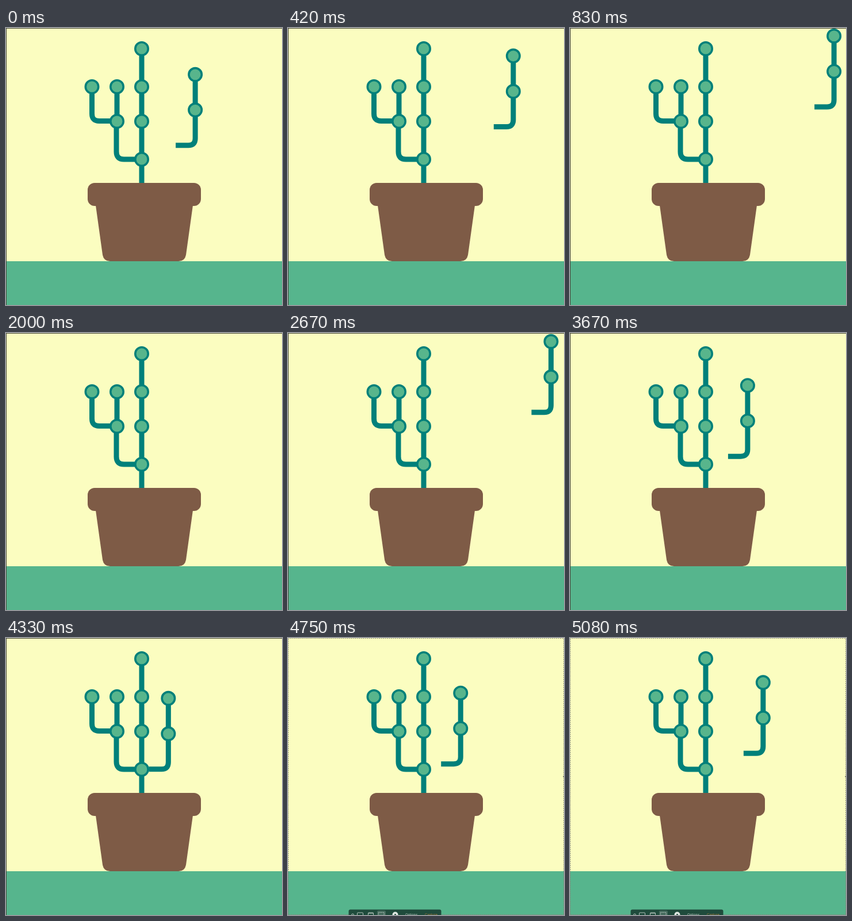
These frames come from a looping animation (480x481 px, 5.16 s). An HTML page:

```html
<!DOCTYPE html>
<html lang="en">
<head>
<meta charset="utf-8">
<title>Potted branches</title>
<style>
html, body { margin: 0; width: 100%; height: 100%; overflow: hidden; background: #fbfdc0; }
svg { display: block; width: 480px; height: 481px; }
.branch { fill: none; stroke: #00807a; stroke-width: 9; }
.node { fill: #58b58c; stroke: #00807a; stroke-width: 3.6; }
.label { font: 5.8px Inter, sans-serif; }
</style>
</head>
<body>
<svg viewBox="0 0 480 481" xmlns="http://www.w3.org/2000/svg">
  <rect width="480" height="481" fill="#fbfdc0"/>
  <rect y="405" width="480" height="76" fill="#56b58d"/>
  <g class="branch">
    <path d="M236 36V270"/>
    <path d="M193 102V162M192 162V215Q192 228 205 228H236"/>
    <path d="M149.5 102V149Q149.5 161.500 162 161.500H193"/>
  </g>
  <g id="arm">
    <path class="branch" d="M0 0V111Q0 123 -12 123H-34"/>
  </g>
  <g id="plant"></g>
  <g fill="#7e5b46">
    <rect x="142" y="269" width="197" height="40" rx="12"/>
    <path d="M156 308H325L313 394Q311 405 300 405H181Q170 405 168 394Z"/>
  </g>
  <path id="edge" d="M0 .5H480M.5 0V481" fill="none" stroke="#45473a"/>
  <g id="panel">
    <rect x=".5" y=".5" width="479" height="480" fill="none" stroke="#85877a" stroke-dasharray="2 1.500"/>
    <rect x="478.500" y="239.500" width="2" height="2" fill="#555"/>
    <rect x="105.500" y="471.500" width="161" height="20" rx="3" fill="#1f4b3c"/>
    <g fill="none" stroke="#c5d2cb" stroke-width=".9">
      <circle cx="112.500" cy="481" r="2"/>
      <rect x="120.500" y="477" width="10" height="8" rx="1"/>
      <rect x="139.500" y="477" width="9" height="8" rx="1"/>
      <path d="M139.500 478H148.500"/>
      <rect x="155" y="473.500" width="15" height="14" rx="2" fill="#466c5e" stroke="none"/>
      <rect x="157.500" y="476.500" width="9.500" height="8" stroke-dasharray="1.500 1"/>
    </g>
    <circle cx="186.500" cy="480.500" r="5" fill="#dfe7e2"/>
    <circle cx="186.500" cy="480.500" r="1.500" fill="#1f4b3c"/>
    <text class="label" x="204" y="483" fill="#b5c6bd">Options</text>
    <text class="label" x="238" y="483" fill="#a87a3c">Capture</text>
  </g>
</svg>
<script>
const LOOP = 5160, SWING = 5030, REST = 4260, PANEL_AT = 4500;
const $ = id => document.getElementById(id);
const arm = $("arm"), panel = $("panel"), edge = $("edge");

function addNode(parent, x, y) {
  const c = document.createElementNS("http://www.w3.org/2000/svg", "circle");
  for (const [k, v] of Object.entries({ cx: x, cy: y, r: 11.2, class: "node" })) c.setAttribute(k, v);
  parent.append(c);
}
[[236, 36], [236, 102], [236, 162], [236, 228], [193, 162], [193, 102], [149.5, 102]]
  .forEach(([x, y]) => addNode($("plant"), x, y));
addNode(arm, 0, 0);
addNode(arm, 0, 61.5);

// Distance from the attached pose, by time away from rest; mirrored for both directions.
const keys = [[0, 0], [340, 8], [590, 27], [770, 47], [930, 70], [1180, 108],
  [1350, 138], [1600, 177], [1940, 220], [2100, 234], [2515, 250]];

function slope(i) {
  if (i === 0 || i === keys.length - 1) return 0;
  const [a, b] = [keys[i - 1], keys[i + 1]];
  return (b[1] - a[1]) / (b[0] - a[0]);
}

function offset(u) {
  let i = 0;
  while (i < keys.length - 2 && u > keys[i + 1][0]) i++;
  const [u0, v0] = keys[i], [u1, v1] = keys[i + 1];
  const h = u1 - u0, s = (u - u0) / h, s2 = s * s, s3 = s2 * s;
  return (2 * s3 - 3 * s2 + 1) * v0 + (3 * s2 - 2 * s3) * v1
    + h * ((s3 - 2 * s2 + s) * slope(i) + (s3 - s2) * slope(i + 1));
}

function draw(t) {
  const phase = (t - REST + SWING) % SWING;
  const d = offset(Math.min(phase, SWING - phase));
  arm.setAttribute("transform", `translate(${282 + d} ${105 - d * 0.514})`);
  const open = t >= PANEL_AT;
  panel.style.display = open ? "" : "none";
  edge.style.display = open ? "none" : "";
}

const start = performance.now();
function tick() {
  draw((performance.now() - start) % LOOP);
  requestAnimationFrame(tick);
}
draw(0);
requestAnimationFrame(tick);
</script>
</body>
</html>
```
